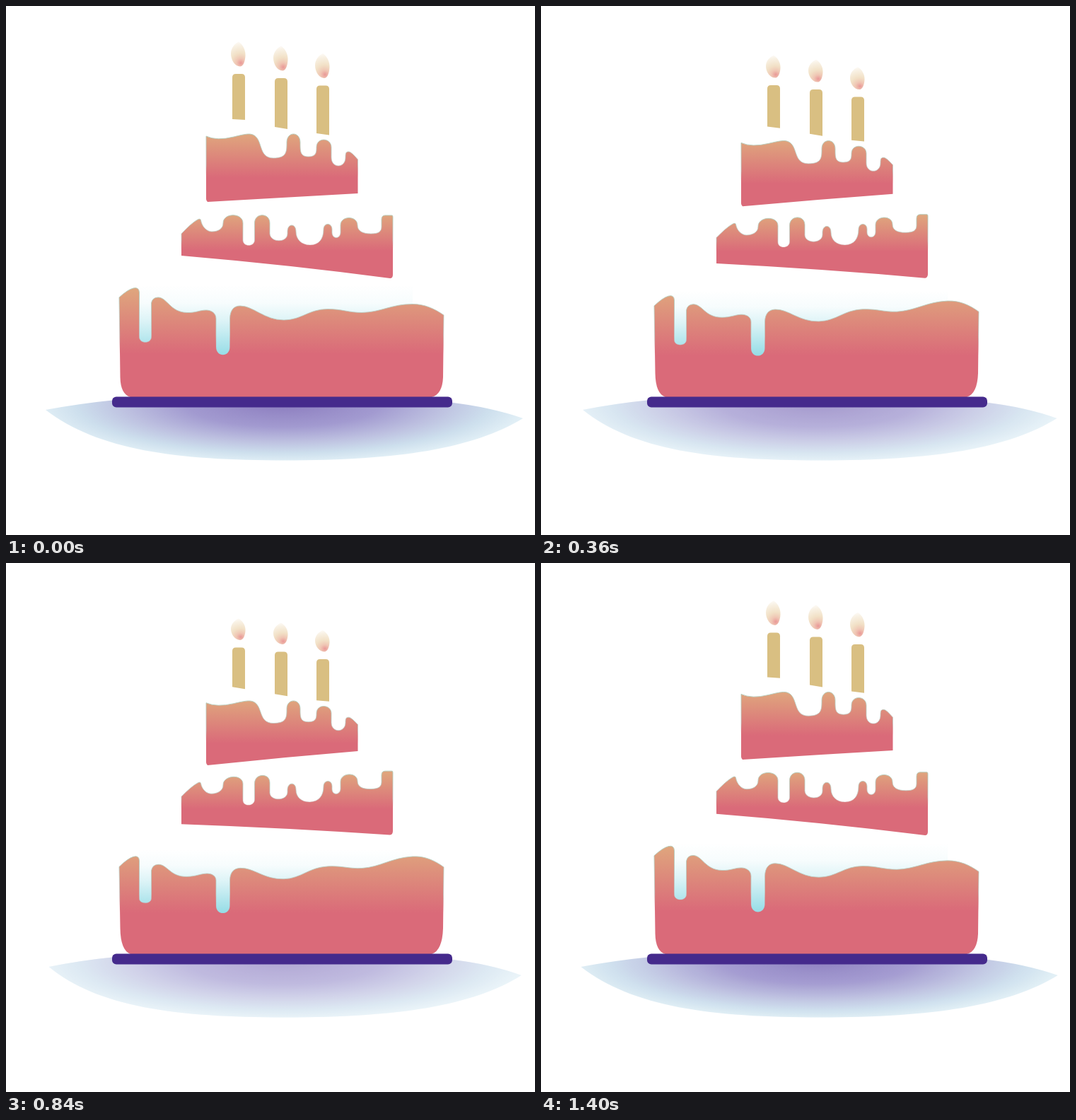
An HTML page with a canvas for the animation above (1440 ms loop, 748 px wide and 748 px high).

```html
<!DOCTYPE html>
<html lang="en">
<head>
<meta charset="utf-8">
<title>Birthday cake</title>
<style>
  html, body { margin: 0; width: 100%; height: 100%; overflow: hidden; background: #fff; }
  canvas { display: block; width: 100vw; height: 100vh; }
</style>
</head>
<body>
<canvas id="stage" width="748" height="748"></canvas>
<script>
const ctx = document.getElementById('stage').getContext('2d');
const LOOP = 1440, STEP = 40, PEAK = 670;
const TAN = '#dfa47d', PINK = '#da6a79';

// Each tier is drawn at rest; drop(x, y) is how far a point sinks.
const tiers = [
  {
    fade: [183, 243],
    sink: 12,
    outline: `M283,184 Q298,191 322,185 C338,181 344,180 349,182
      C364,188 356,215 378,215 C397,215 397,206 397,193
      C397,177 416,177 416,193 C416,206 416,213 428,213
      C439,213 439,206 439,200 C439,185 460,186 460,200
      L460,214 C460,230 480,230 480,214 C480,207 481,206 485,206
      Q488,206 497.5,217 L497.5,265 Q390,271 285,277 Q283,275 283,273 Z`,
    drop(x, y) {
      if (y < 250) return 13.7 - 0.07 * (y - 182);
      return 1 + 8 * Math.max(0, (497 - x) / 214) ** 1.5;
    }
  },
  {
    fade: [296, 346],
    sink: 2,
    outline: `M248,322 Q262,307 271,302 Q275,300 275.5,303
      C277,312 284,319 291,319 C300,319 307,315 307,307
      C307,292 335,292 335,307 L335,331 C335,341 351.5,341 351.5,331
      L351.5,307 C351.5,292 373,292 373,307 L373,322
      C374,335 398,335 398,322 L398,319 C398,307 410,307 410,319
      C410,330 418,338 430,338 C442,338 449,330 449,316
      C449,306 461,306 461,316 L461,320 C461,330 473,330 473,320
      L473,310 C473,296 497,296 497,310 C497,318 504,322 516,322
      C527,322 531,319 531,312 L531,302 Q531,296 536,296
      L545,296 Q547,295.5 547,298 L547,380 Q547,385 543,385
      Q400,366 248,353 Z`,
    drop(x, y) {
      if (y > 345) return 17 * Math.max(0, (547 - x) / 299) ** 0.8 - 1;
      const w = Math.min(1, Math.max(0, (540 - x) / 270));
      return 11 * w ** 1.3 - 2 - 0.04 * (y - 300);
    }
  },
  {
    fade: [403, 492],
    sink: 3,
    outline: `M160,412 Q172,401 180,399 Q188,397 188.5,405
      L188.5,468 C188.5,478 205.5,478 205.5,468 L205.5,420
      Q207,412 215,412 C228,412 232,433 256,433.5
      C268,434 274,430 283,430 C290,430 297,434 297,442
      L297,482 C297,497 316.5,497 316.5,482 L316.5,442
      C317,430 322,424 331,424 C350,424 365,444 393,444
      C418,444 428,428.5 455,428.5 C475,428.5 485,433.5 503,433.5
      C530,433 545,421.5 575,421.5 C592,421.5 606,428 619,437
      L618,525 Q617,549 602,553 L176,553 Q162,549 161.5,525 Z`,
    drop(x, y) {
      if (y > 500) return 0.3 * (y - 553);
      return (16 - 0.057 * (x - 182)) * Math.min(1, (552 - y) / 130) ** 2;
    }
  }
];

const candles = [
  { x: 320, top: 96, left: 160, right: 161, leftDrop: 15, rightDrop: 17 },
  { x: 380, top: 102, left: 171, right: 174, leftDrop: 14, rightDrop: 14 },
  { x: 439, top: 112.5, left: 180, right: 182.5, leftDrop: 14, rightDrop: 13 }
];

function addStops(gradient, stops) {
  stops.forEach(([at, color]) => gradient.addColorStop(at, color));
  return gradient;
}

const vertical = (y0, y1, ...stops) =>
  addStops(ctx.createLinearGradient(0, y0, 0, y1), stops);

const radial = (x, y, r, ...stops) =>
  addStops(ctx.createRadialGradient(x, y, 0, x, y, r), stops);

function drawTier({ outline, drop, fade, sink }, amount) {
  const path = new Path2D(outline.replace(/([\d.]+),([\d.]+)/g,
    (_, x, y) => `${x},${(+y + drop(+x, +y) * amount).toFixed(2)}`));
  const [y0, y1] = fade.map(y => y + sink * amount);
  ctx.fillStyle = vertical(y0, y1, [0, TAN], [1, PINK]);
  ctx.fill(path);
  ctx.strokeStyle = vertical(y0, y1,
    [0, 'rgba(178,205,188,.9)'], [0.7, 'rgba(190,205,200,.7)'], [1, 'rgba(218,106,121,0)']);
  ctx.lineWidth = 1;
  ctx.stroke(path);
}

function drawIcing(amount) {
  ctx.fillStyle = vertical(395 + 10 * amount, 495,
    [0, 'rgba(150,220,230,0)'], [0.25, 'rgba(150,220,230,.08)'],
    [0.5, 'rgba(150,220,230,.33)'], [1, '#94dce6']);
  ctx.fillRect(188, 390, 387, 106);
}

function drawCandle({ x, top, left, right, leftDrop, rightDrop }, amount) {
  const y = top + 23.2 * amount;
  ctx.fillStyle = '#d9bf82';
  ctx.beginPath();
  ctx.moveTo(x, left + leftDrop * amount);
  ctx.lineTo(x, y + 5);
  ctx.quadraticCurveTo(x, y, x + 5, y);
  ctx.lineTo(x + 13, y);
  ctx.quadraticCurveTo(x + 18, y, x + 18, y + 5);
  ctx.lineTo(x + 18, right + rightDrop * amount);
  ctx.fill();
  drawFlame(x + 8, y - 10.5, 35 - 4.5 * amount);
}

function drawFlame(x, base, height) {
  ctx.save();
  ctx.translate(x, base);
  ctx.scale(1, height / 35);
  ctx.fillStyle = radial(4, -5, 31,
    [0, 'rgba(222,95,95,.65)'], [0.2, 'rgba(224,140,105,.5)'],
    [0.45, 'rgba(222,180,115,.4)'], [0.8, 'rgba(222,185,120,.2)'], [1, 'rgba(222,185,120,.04)']);
  ctx.beginPath();
  ctx.moveTo(1, -35);
  ctx.bezierCurveTo(8, -30, 11, -22, 10.5, -15);
  ctx.bezierCurveTo(10, -6, 7, 0, 3, 0);
  ctx.bezierCurveTo(-4, 0, -10, -9, -10, -18);
  ctx.bezierCurveTo(-10, -26, -5, -32, 1, -35);
  ctx.fill();
  ctx.restore();
}

function drawShadow(squash) {
  const tip = 56 + 6 * squash;
  ctx.save();
  ctx.beginPath();
  ctx.moveTo(tip, 571);
  ctx.quadraticCurveTo(105, 562, 155, 557);
  ctx.lineTo(625, 560);
  ctx.quadraticCurveTo(685, 567, 731 - 3 * squash, 583);
  ctx.bezierCurveTo(660, 626, 555, 642.5, 395, 642.5);
  ctx.bezierCurveTo(240, 642.5, 130, 628, tip, 571);
  ctx.clip();
  ctx.translate(392, 562);
  ctx.scale(1, 0.24);
  ctx.fillStyle = radial(0, 0, 345,
    [0, '#8c7dbf'], [0.4, '#a29ad0'], [0.65, '#bdc0e0'], [0.85, '#cddfed'], [1, '#e1eff6']);
  ctx.fillRect(-400, -400, 800, 800);
  ctx.fillStyle = `rgba(255,255,255,${0.4 * squash})`;
  ctx.fillRect(-400, -400, 800, 800);
  ctx.restore();
}

function drawPlate() {
  ctx.fillStyle = '#452a8c';
  ctx.beginPath();
  ctx.roundRect(150, 552.5, 481, 15, 6);
  ctx.fill();
}

// Linear squash, then a slower linear rise.
function squashAt(t) {
  return t < PEAK ? t / PEAK : 1 - 0.97 * (t - PEAK) / (LOOP - PEAK);
}

function draw() {
  const t = Math.floor((performance.now() % LOOP) / STEP) * STEP;
  const squash = squashAt(t);
  const amount = squash / 0.776;
  ctx.fillStyle = '#fff';
  ctx.fillRect(0, 0, 748, 748);
  drawShadow(squash);
  drawIcing(amount);
  tiers.forEach(tier => drawTier(tier, amount));
  candles.forEach(candle => drawCandle(candle, amount));
  drawPlate();
  requestAnimationFrame(draw);
}

draw();
</script>
</body>
</html>
```
